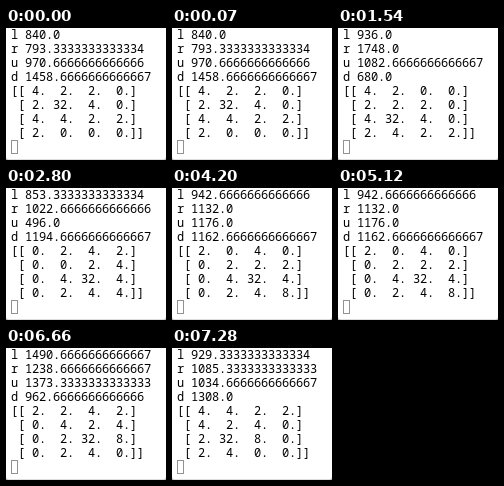
Write an HTML page with a canvas that moves like this. It is 160x132 px and loops after 8 s.

```html
<!DOCTYPE html>
<html>
<head>
<meta charset="utf-8">
<style>
html, body { margin: 0; width: 100%; height: 100%; overflow: hidden; background: #fff; }
canvas { display: block; }
</style>
</head>
<body>
<canvas id="stage" width="160" height="132"></canvas>
<script>
const ctx = document.getElementById('stage').getContext('2d');
const LOOP = 8000, CELL_W = 7, CELL_H = 14, LEFT = 5, BASE = 11;

// Each screen: start time, scores for l r u d, board rows.
const screens = [
  [0, '840.0 793.3333333333334 970.6666666666666 1458.6666666666667',
    '4220 2 32 4 0 4422 2000'],
  [1540, '936.0 1748.0 1082.6666666666667 680.0',
    '4200 2220 4 32 4 0 2422'],
  [2800, '853.3333333333334 1022.6666666666666 496.0 1194.6666666666667',
    '0242 0024 0 4 32 4 0244'],
  [4200, '942.6666666666666 1132.0 1176.0 1162.6666666666667',
    '2040 0222 0 4 32 4 0248'],
  [5740, '1490.6666666666667 1238.6666666666667 1373.3333333333333 962.6666666666666',
    '2242 0424 0 2 32 8 0240'],
  [7280, '929.3333333333334 1085.3333333333333 1034.6666666666667 1308.0',
    '4422 4240 2 32 8 0 2400']
].map(([start, scores, board]) => ({ start, lines: layout(scores, board) }));

function layout(scores, board) {
  const head = scores.split(' ').map((s, i) => 'lrud'[i] + ' ' + s);
  const cells = board.match(/32|\d/g);
  const rows = [0, 1, 2, 3].map(r => {
    const nums = cells.slice(r * 4, r * 4 + 4).map(n => n.padStart(2) + '.');
    return (r ? ' [' : '[[') + nums.join(' ') + (r < 3 ? ']' : ']]');
  });
  return head.concat(rows);
}

function drawLine(text, row) {
  [...text].forEach((ch, col) =>
    ctx.fillText(ch, LEFT + col * CELL_W, BASE + row * CELL_H));
}

function draw(t) {
  const screen = screens.filter(s => s.start <= t).pop();
  // Window with rounded lower corners over a grey edge.
  ctx.fillStyle = '#bbb';
  ctx.fillRect(0, 0, 160, 132);
  ctx.fillStyle = '#fff';
  ctx.beginPath();
  ctx.roundRect(0, 0, 160, 131.5, [0, 0, 3, 3]);
  ctx.fill();

  ctx.fillStyle = '#000';
  ctx.font = '12px "Noto Sans Mono", "DejaVu Sans Mono", monospace';
  screen.lines.forEach(drawLine);

  ctx.strokeStyle = '#929292';
  ctx.lineWidth = 1;
  ctx.strokeRect(5.5, 112.5, 6, 13);
}

const begin = performance.now();
function tick() {
  draw((performance.now() - begin) % LOOP);
  requestAnimationFrame(tick);
}
tick();
</script>
</body>
</html>
```
